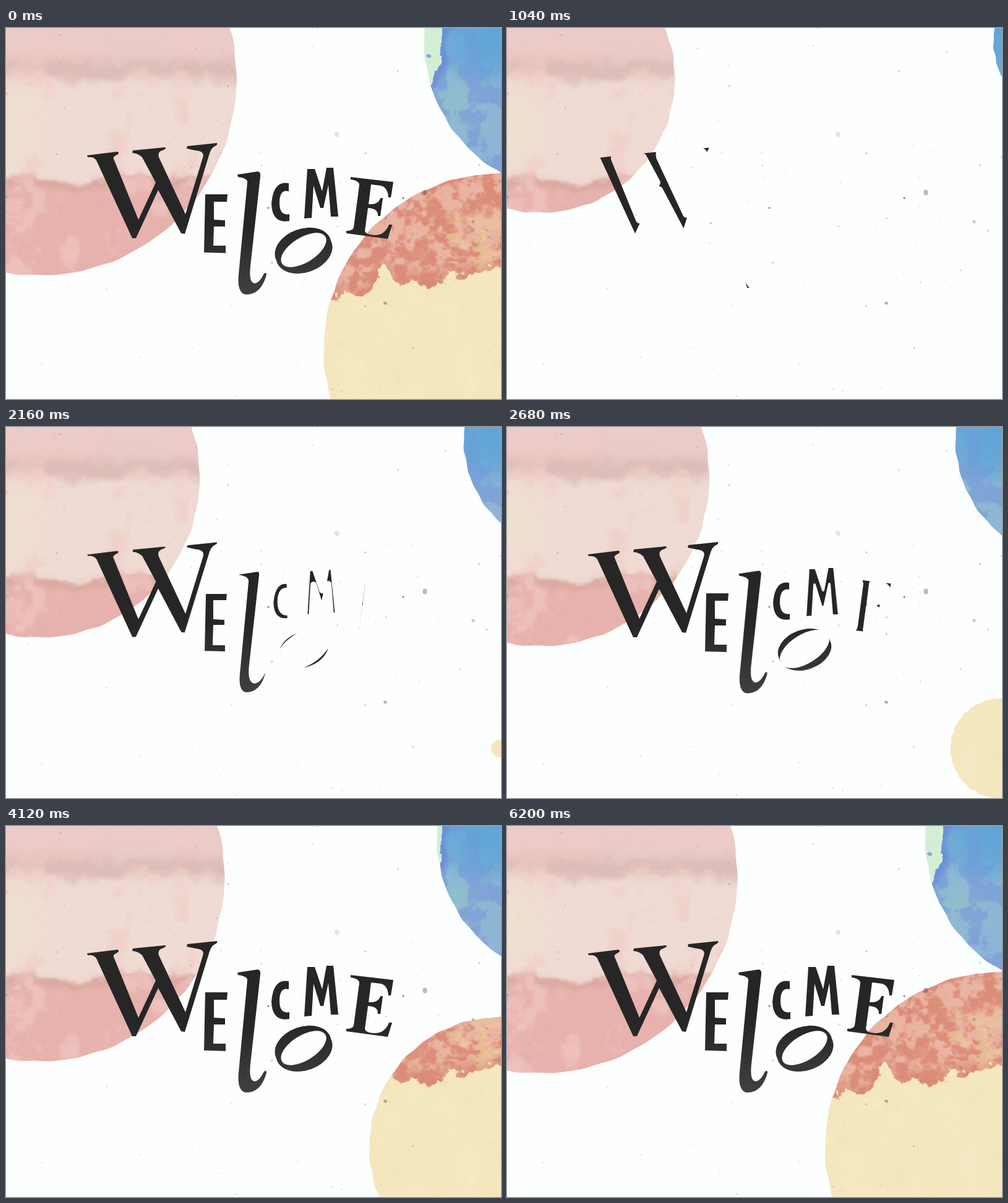
An HTML page with a canvas for the animation above (6.24 s loop, 800 by 600 pixels).

```html
<!DOCTYPE html>
<html lang="en">
<head>
<meta charset="utf-8">
<title>Welcome</title>
<style>
html, body { margin: 0; width: 100%; height: 100%; overflow: hidden; background: #fdfefe; }
canvas { display: block; }
</style>
</head>
<body>
<canvas id="stage" width="800" height="600" role="img" aria-label="Welcome"></canvas>
<script>
const W = 800, H = 600, LOOP = 6240, STEP = 40;
const ctx = document.getElementById('stage').getContext('2d');

function layer(w, h) {
  const c = document.createElement('canvas');
  c.width = w;
  c.height = h;
  return c;
}

// ---------- noise and colour helpers ----------
const clamp = v => Math.max(0, Math.min(1, v));
const mix = (a, b, k) => a.map((v, i) => v + (b[i] - v) * k);
const smooth = (a, b, v) => { const k = clamp((v - a) / (b - a)); return k * k * (3 - 2 * k); };
const bump = (v, mid, width) => Math.exp(-(((v - mid) / width) ** 2));

function hash(x, y) {
  let h = Math.imul(x, 374761393) + Math.imul(y, 668265263);
  h = Math.imul(h ^ (h >>> 13), 1274126177);
  return ((h ^ (h >>> 16)) >>> 0) / 4294967296;
}

function noise(x, y) {
  const i = Math.floor(x), j = Math.floor(y);
  const u = smooth(0, 1, x - i), v = smooth(0, 1, y - j);
  const a = hash(i, j), b = hash(i + 1, j), c = hash(i, j + 1), d = hash(i + 1, j + 1);
  return a + (b - a) * u + (c - a + (a - b - c + d) * u) * v;
}

// Layered noise, about -0.5 to 0.5
function fbm(x, y) {
  let sum = 0;
  for (let amp = 0.5; amp > 0.02; amp *= 0.55) {
    sum += amp * (noise(x, y) - 0.5);
    x = x * 2 + 17;
    y = y * 2 + 31;
  }
  return sum;
}

// ---------- watercolour washes ----------
function pinkWash(x, y) {
  const n = fbm(x / 36, y / 36);
  const v = y + n * 38;
  let c = mix([235, 203, 200], [239, 219, 211], smooth(70, 92, v));
  c = mix(c, [231, 178, 173], smooth(238, 250, v));
  c = mix(c, [217, 184, 179], 0.75 * bump(v, 65, 17));
  c = mix(c, [212, 165, 155], 0.6 * bump(v, 250, 9));
  c = mix(c, [241, 228, 203], 0.6 * clamp(1 - x / 70) * bump(y, 155, 60));
  return mix(c, [241, 202, 198], smooth(0.02, 0.25, n) * 0.6);
}

function blueWash(x, y) {
  const n = fbm(x / 28, y / 28);
  let c = mix([112, 170, 215], [142, 181, 213], smooth(30, 110, y + n * 60));
  c = mix(c, [144, 191, 204], 0.8 * clamp(1.1 - Math.hypot(x - 715, y - 130) / 70 + n));
  c = mix(c, [116, 149, 217], 0.55 * smooth(0.02, 0.12, fbm(x / 36 + 9, y / 36 + 4)));
  c = mix(c, [92, 164, 214], 0.7 * clamp(1.2 - Math.hypot(x - 780, y - 25) / 60 + n));
  const rim = 704 + n * 18 - Math.max(0, y - 50) * 0.35;
  c = mix(c, [104, 134, 214], 0.65 * bump(x, rim + 4, 6) * smooth(120, 80, y));
  if (x < rim && y < 92) c = [212, 238, 214];
  return Math.hypot(x - 683, y - 45) < 5 + n * 12 ? [140, 168, 218] : c;
}

function sunWash(x, y) {
  const n = fbm(x / 30, y / 30), fine = fbm(x / 13, y / 13);
  const finger = 34 * bump(x, 608, 18);
  const edge = 436 - (x - 525) * 0.17 - finger + n * 45 + fine * 22;
  const paper = mix([246, 233, 196], [242, 228, 184], clamp(0.4 + n + fine * 0.5));
  let c = mix([233, 180, 162], [219, 141, 121], smooth(-0.14, 0.16, fine + n * 0.6));
  c = mix(c, [234, 203, 158], 0.75 * smooth(0, 0.15, fbm(x / 22, y / 14 + 8))
    * smooth(640, 740, x) * smooth(280, 340, y));
  c = mix(c, [214, 134, 111], 0.5 * bump(y, edge, 14));
  return mix(c, paper, smooth(-2, 2, y - edge));
}

function paint(wash, x0, y0, w, h) {
  const c = layer(w, h), g = c.getContext('2d');
  const img = g.createImageData(w, h);
  for (let y = 0, p = 0; y < h; y++) {
    for (let x = 0; x < w; x++, p += 4) {
      const grain = (hash(x + x0, y + y0) - 0.5) * 6;
      const col = wash(x + x0, y + y0);
      for (let k = 0; k < 3; k++) img.data[p + k] = col[k] + grain;
      img.data[p + 3] = 255;
    }
  }
  g.putImageData(img, 0, 0);
  return c;
}

// All discs share one growth curve; "start" shifts it in time
const discs = [
  { x: 54, y: 81.5, size: 333, start: -1600, left: 0, top: 0, art: paint(pinkWash, 0, 0, 385, 412) },
  { x: 923, y: 20, size: 263, start: -820, left: 660, top: 0, art: paint(blueWash, 660, 0, 140, 250) },
  { x: 798, y: 520, size: 340, start: 1700, left: 500, top: 225, art: paint(sunWash, 500, 225, 300, 375) }
];

// Soft start, then a long exponential settle
function grow(t) {
  const u = Math.max(0, t);
  return 1 - Math.exp(-0.0004 * u * (1 - Math.exp(-((u / 900) ** 2))));
}

function drawDisc(disc, t) {
  const r = disc.size * grow(t - disc.start);
  if (r <= 0) return;
  ctx.save();
  ctx.beginPath();
  for (let i = 0; i < 180; i++) {
    const a = i * Math.PI / 90;
    const rr = r + Math.min(1, r / 80) * (0.6 * Math.sin(a * 23) + 0.5 * Math.sin(a * 37 + 2));
    ctx.lineTo(disc.x + rr * Math.cos(a), disc.y + rr * Math.sin(a));
  }
  ctx.clip();
  ctx.drawImage(disc.art, disc.left, disc.top);
  ctx.restore();
}

// ---------- paper specks ----------
function makeSpecks() {
  const c = layer(W, H), g = c.getContext('2d');
  const dot = (x, y, r, a) => {
    g.fillStyle = `rgba(70,70,72,${a})`;
    g.beginPath();
    g.ellipse(x, y, r, r * 0.8, x, 0, 7);
    g.fill();
  };
  dot(677, 266, 4.5, 0.36);
  dot(535, 172, 4.5, 0.14);
  dot(424, 291, 1.6, 0.75);
  dot(642, 275, 1.7, 0.7);
  dot(613, 445, 3, 0.4);
  dot(755, 313, 2.8, 0.3);
  for (let i = 0; i < 640; i++) {
    const dense = i > 300;
    const u = hash(i, 101), v = hash(i, 202), s = hash(i, 303);
    const x = dense ? 385 + u * 340 : u * W;
    const y = dense ? 190 + v * 235 : v * H;
    dot(x, y, 0.5 + s ** 6 * (dense ? 0.4 : 1.3), 0.08 + 0.2 * s * s);
  }
  return c;
}
const specks = makeSpecks();

// ---------- lettering, in order of appearance ----------
const letters = [
  // W
  `M131,206L180,200Q186,202 176,207Q172,209 175,214L214,310L242,250L220,209Q214,203 204,202
   L205,198L257,193Q261,195 250,199Q245,202 247,209L290,301L318,210Q322,199 306,198L292,195
   L293,191L341,186Q343,189 336,192Q331,195 328,206L289,333L283,332L246,262L210,340L204,340
   L146,214Q142,208 132,209Z`,
  // E
  'M322,269H358L357,281H336V310L354,311V321H336L335,352H355V364L320,363Z',
  // l
  `M374,237L407,232Q412,233 411,240L395,385Q392,412 402,413Q410,412 417,397Q421,394 421,399
   Q412,432 387,431Q373,428 376,398L390,250Q391,243 375,241Z`,
  // c
  'M457,251Q432,246 429,284Q430,317 458,312V301Q442,304 442,283Q442,260 457,264Z',
  // M
  'M482,308L487,228H499L511,264L518,226H529L537,305H525L521,254L513,291H508L497,255L494,307Z',
  // o
  `M437,376A47,32.5 -20 1 1 525,344A47,32.5 -20 1 1 437,376Z
   M446,381A41,20 -32 1 1 516,337A41,20 -32 1 1 446,381Z`,
  // E
  `M557,241L626,249L622,274H618Q617,258 606,255L590,253L586,285Q602,286 605,275H609L605,304H601
   Q602,292 585,291L580,328Q581,334 594,335Q612,336 619,318H624L617,341L550,332V328
   Q561,328 562,322L571,254Q571,247 557,245Z`
].map((d, i) => ({ path: new Path2D(d), done: 2550 + 250 * i }));

const ink = layer(W, H), pen = ink.getContext('2d');
const shade = pen.createLinearGradient(0, 320, 0, 420);
shade.addColorStop(0, '#262626');
shade.addColorStop(1, '#3e3e3e');
pen.fillStyle = shade;
pen.lineJoin = 'round';

// Letters swell outwards from their thickest parts
function drawLetter({ path, done }, t) {
  const inset = 2.6e-6 * Math.max(0, done - t) ** 2;
  if (inset > 14) return;
  pen.clearRect(0, 0, W, H);
  pen.globalCompositeOperation = 'source-over';
  pen.fill(path, 'evenodd');
  if (inset > 0) {
    pen.globalCompositeOperation = 'destination-out';
    pen.lineWidth = inset * 2;
    pen.stroke(path);
  }
  ctx.drawImage(ink, 0, 0);
}

function draw(time) {
  const t = Math.floor((time % LOOP) / STEP) * STEP || LOOP;
  ctx.fillStyle = '#fdfefe';
  ctx.fillRect(0, 0, W, H);
  discs.forEach(d => drawDisc(d, t));
  ctx.drawImage(specks, 0, 0);
  letters.forEach(l => drawLetter(l, t));
}

let start;
function tick(now) {
  if (start === undefined) start = now;
  draw(Math.max(0, now - start));
  requestAnimationFrame(tick);
}
draw(0);
requestAnimationFrame(tick);
</script>
</body>
</html>
```
